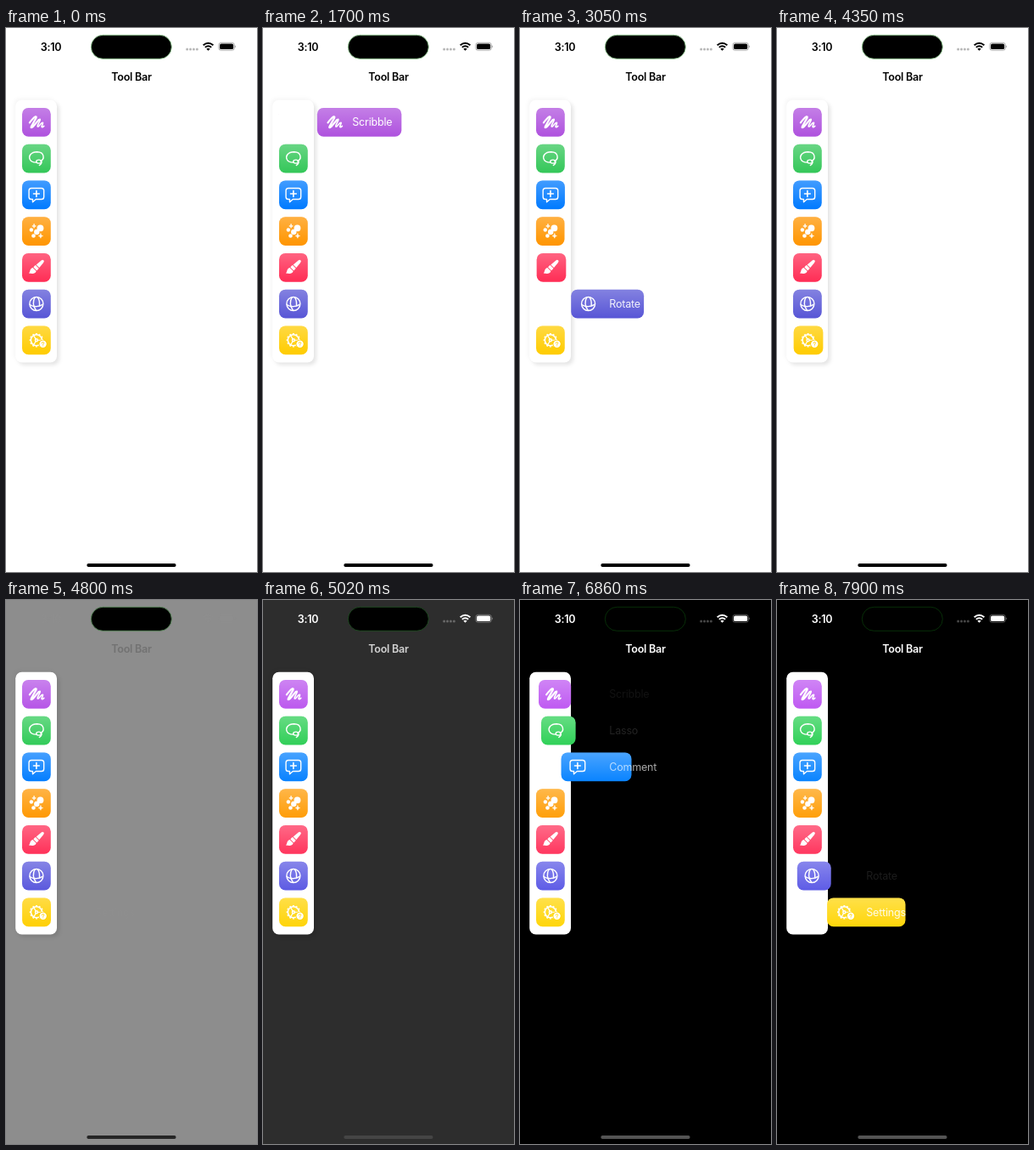
Recreate the animation shown at these times as an HTML page. Size 296x640 px, loop 8000 ms.

```html
<!DOCTYPE html>
<html lang="en">
<head>
<meta charset="utf-8">
<title>Tool Bar</title>
<style>
  html, body { margin: 0; width: 100%; height: 100%; overflow: hidden; background: #fff; }
  svg { display: block; width: 100vw; height: 100vh; }
  text { font: 400 12.5px Inter, "Open Sans", sans-serif; letter-spacing: -.2px; }
  .bold { font-weight: 600; letter-spacing: -.25px; }
  .panel { fill: #fff; filter: drop-shadow(3.5px 3.5px 2.2px rgba(0,0,0,.1)) drop-shadow(-2px -2px 2.2px rgba(0,0,0,.035)); }
  .label { fill: #fff; }
  .icon { fill: none; stroke: #fff; stroke-width: 1.4; stroke-linecap: round; stroke-linejoin: round; }
  .icon .solid { fill: #fff; stroke: none; }
</style>
</head>
<body>
<svg viewBox="0 0 296 640" preserveAspectRatio="none">
  <defs>
    <linearGradient id="sheen" x2="0" y2="1">
      <stop stop-color="#fff" stop-opacity=".26"/>
      <stop offset="1" stop-color="#fff" stop-opacity="0"/>
    </linearGradient>
  </defs>
  <rect id="screen" width="296" height="640"/>
  <rect id="island" x="100.3" y="8.3" width="95" height="28" rx="14" stroke-width=".9"/>
  <g id="status">
    <text class="bold" x="40.8" y="26.5">3:10</text>
    <g opacity=".28">
      <circle cx="213.6" cy="25" r="1.5"/><circle cx="217.5" cy="25" r="1.5"/>
      <circle cx="221.4" cy="25" r="1.5"/><circle cx="225.3" cy="25" r="1.5"/>
    </g>
    <g fill="none" stroke="currentColor" stroke-width="1.9">
      <path d="M232.6 20.3Q238.5 15.3 244.4 20.3"/>
      <path d="M234.8 22.8Q238.5 19.7 242.2 22.8"/>
    </g>
    <path d="M238.5 26.8L236.3 24.5Q238.5 22.8 240.7 24.5Z"/>
    <rect x="250.8" y="17.3" width="18.6" height="9" rx="2.9" fill="none" stroke="currentColor" stroke-opacity=".4" stroke-width=".8"/>
    <rect x="252" y="18.5" width="16.2" height="6.6" rx="1.9"/>
    <path d="M270.3 20.2Q272 21.8 270.3 23.4Z" opacity=".5"/>
  </g>
  <text id="title" class="bold" x="148" y="61.5" text-anchor="middle">Tool Bar</text>
  <rect class="panel" x="11.2" y="84.7" width="48.8" height="308.8" rx="7.5"/>
  <g id="tools"></g>
  <rect id="home" x="95.3" y="630" width="105.2" height="4" rx="2"/>
</svg>
<script>
const LOOP = 8000;
const ROW = 42.75, SIZE = 33.75, LEFT = 19, TOP = 93.9, LIFT = 45, PAD = 3.75;
const LABEL_X = 105.3;

const gearTeeth = Array.from({ length: 12 }, (_, i) =>
  `<path d="M0 -7V-8.2" transform="rotate(${i * 30})" stroke-width="2" stroke-linecap="butt"/>`).join('');
const sparkle = (x, y, r) =>
  `<path class="solid" d="M${x} ${y - r}Q${x} ${y} ${x + r} ${y}Q${x} ${y} ${x} ${y + r}Q${x} ${y} ${x - r} ${y}Q${x} ${y} ${x} ${y - r}" style="stroke:#fff;stroke-width:.7"/>`;
const bubble = (x, y, r) => `<circle class="solid" cx="${x}" cy="${y}" r="${r}"/>`;

// label, label width, light colour, dark colour, icon
const tools = [
  ['Scribble', 47, [175, 82, 222], [191, 90, 242],
    `<path d="M-8 .6Q-4 -4.8 -1.4 -6.4Q.4 -7 -.4 -4.9L-6 5Q-7 7.6 -4.2 5.4L2.6 -2.6" stroke-width="2.2"/>
     <path d="M2.6 -2.6Q5 -4.6 4.2 -2L1.5 3.6Q.6 6.4 3 4.5L6.2 1Q8.4 -.3 7.4 2L6.2 4.8Q6 7.2 8.9 4.6" stroke-width="1.6"/>`],
  ['Lasso', 33, [52, 199, 89], [48, 209, 88],
    `<path d="M4.8 3.2C10 .6 9.6 -7.6 .8 -7.8C-6.6 -7.8 -9.6 -2.6 -7.6 1.2C-6 4.2 -2.6 4.8 .2 4.6"/>
     <ellipse cx="2.9" cy="3.6" rx="3.1" ry="2"/><path d="M5.8 4Q6.4 6.4 3.4 8"/>`],
  ['Comment', 56, [0, 122, 255], [10, 132, 255],
    `<path d="M-6 -7.8H6Q8.8 -7.8 8.8 -5V2.4Q8.8 5.2 6 5.2H-.6L-4.4 8.4V5.2H-6Q-8.8 5.2 -8.8 2.4V-5Q-8.8 -7.8 -6 -7.8Z"/>
     <path d="M-3.4 -1.3H3.4M0 -4.7V2.1" stroke-width="1.6"/>`],
  ['Enhance', 50, [255, 149, 0], [255, 159, 10],
    bubble(4.6, -3.6, 3.9) + bubble(.4, .9, 3.2) + bubble(-6, -1.6, 2.2) + bubble(-3.4, 5.4, 2.3) +
    sparkle(-2.8, -6, 2.3) + sparkle(5, 5.6, 2.6)],
  ['Picker', 38, [255, 45, 85], [255, 55, 95],
    `<g class="solid" transform="rotate(45)">
       <path d="M0 -12Q1.7 -12 1.9 -9.6L2.6 -2.2H-2.6L-1.9 -9.6Q-1.7 -12 0 -12Z"/>
       <rect x="-2.9" y="-1.3" width="5.8" height="3.6" rx=".6"/>
       <path d="M-2.9 3.2H2.9C4.6 6.6 1.6 8.8 -1.6 11C-1.4 8.6 -4.8 6.6 -2.9 3.2Z"/>
     </g>`],
  ['Rotate', 38, [88, 86, 214], [94, 92, 230],
    `<circle r="8"/><path d="M-1.6 -7.8C-4.6 -3.4 -4.2 3.4 -.4 7.4"/>
     <path d="M-7.8 1C-3.4 4 3.2 3.8 7.2 .8M1.4 -7.8Q4 -4.6 3.6 1.4"/>`],
  ['Settings', 47, [255, 204, 0], [255, 214, 10],
    `<circle r="6.5" stroke-width="1.5"/>${gearTeeth}
     <path d="M1.4 0H6M-.7 -1.2L-3.2 -5.4M-.7 1.2L-3.2 5.4" stroke-width="1.2"/><circle r="1.5"/>
     <circle class="badge" cx="7.7" cy="4.5" r="5.1" stroke="none"/>${bubble(7.7, 4.5, 4.2)}
     <path class="mark" d="M6.4 3.5Q6.6 2.2 7.8 2.3Q9.2 2.5 8.8 3.8Q8.5 4.3 7.8 4.8V5.2M7.8 6.7V6.8" stroke-width=".9"/>`]
];

// tool index, time it is picked, time it is let go
const picks = [
  [0, 1000, 1990], [1, 1990, 2130], [2, 2130, 2280], [3, 2280, 2450],
  [4, 2450, 2800], [5, 2835, 3250], [6, 3250, 4100],
  [0, 5730, 6638], [1, 6686, 6717], [2, 6717, 6900], [3, 6900, 7090],
  [4, 7090, 7250], [5, 7250, 7695], [6, 7695, 9000]
];

const $ = id => document.getElementById(id);
const clamp = v => Math.min(1, Math.max(0, v));
const mix = (a, b, k) => `rgb(${a.map((v, i) => Math.round(v + (b[i] - v) * k))})`;
const BLACK = [0, 0, 0], WHITE = [255, 255, 255];

// Step response of a spring: response .5 s, damping .7
function spring(ms) {
  if (ms <= 0) return 0;
  const t = ms / 1000, w = 2 * Math.PI / .5, z = .7, d = Math.sqrt(1 - z * z);
  return 1 - Math.exp(-z * w * t) * (Math.cos(w * d * t) + z / d * Math.sin(w * d * t));
}

$('tools').innerHTML = tools.map(([name, , , , icon], i) => `
  <g transform="translate(0 ${TOP + i * ROW})">
    <rect class="pill" height="${SIZE}" rx="7.5"/>
    <rect class="pill" height="${SIZE}" rx="7.5" fill="url(#sheen)"/>
    <g class="icon">${icon}</g>
    <text class="label" x="${LABEL_X}" y="21.4">${name}</text>
  </g>`).join('');

const rows = [...$('tools').children].map(row => ({
  pills: row.querySelectorAll('.pill'),
  icon: row.querySelector('.icon'),
  label: row.querySelector('.label'),
  badge: row.querySelector('.badge'),
  mark: row.querySelector('.mark')
}));

function drawTool(row, i, t, dark) {
  const [, labelWidth, light, night] = tools[i];
  const p = picks.reduce((sum, [tool, on, off]) =>
    tool === i ? sum + spring(t - on) - spring(t - off) : sum, 0);
  const x = LEFT + LIFT * p;
  const fullWidth = LABEL_X + labelWidth + 11.25 - LEFT - LIFT;
  const color = mix(light, night, dark);
  for (const pill of row.pills) {
    pill.setAttribute('x', x);
    pill.setAttribute('width', SIZE + (fullWidth - SIZE) * p);
  }
  row.pills[0].setAttribute('fill', color);
  row.icon.setAttribute('transform', `translate(${x + PAD * p + SIZE / 2} ${SIZE / 2})`);
  row.label.setAttribute('opacity', clamp(p));
  if (row.badge) {
    row.badge.setAttribute('fill', color);
    row.mark.setAttribute('stroke', color);
  }
}

function draw(t) {
  const dark = clamp((t - 4540) / 585);
  const ink = mix(BLACK, WHITE, clamp(dark * 1.25));
  $('screen').setAttribute('fill', mix(WHITE, BLACK, dark));
  $('title').setAttribute('fill', mix(BLACK, WHITE, dark));
  $('status').setAttribute('fill', ink);
  $('status').setAttribute('color', ink);
  $('home').setAttribute('fill', mix(BLACK, [84, 84, 84], dark));
  $('island').setAttribute('stroke', mix([150, 205, 150], [8, 52, 10], dark));
  rows.forEach((row, i) => drawTool(row, i, t, dark));
}

const start = performance.now();
function tick() {
  draw((performance.now() - start) % LOOP);
  requestAnimationFrame(tick);
}
tick();
</script>
</body>
</html>
```
